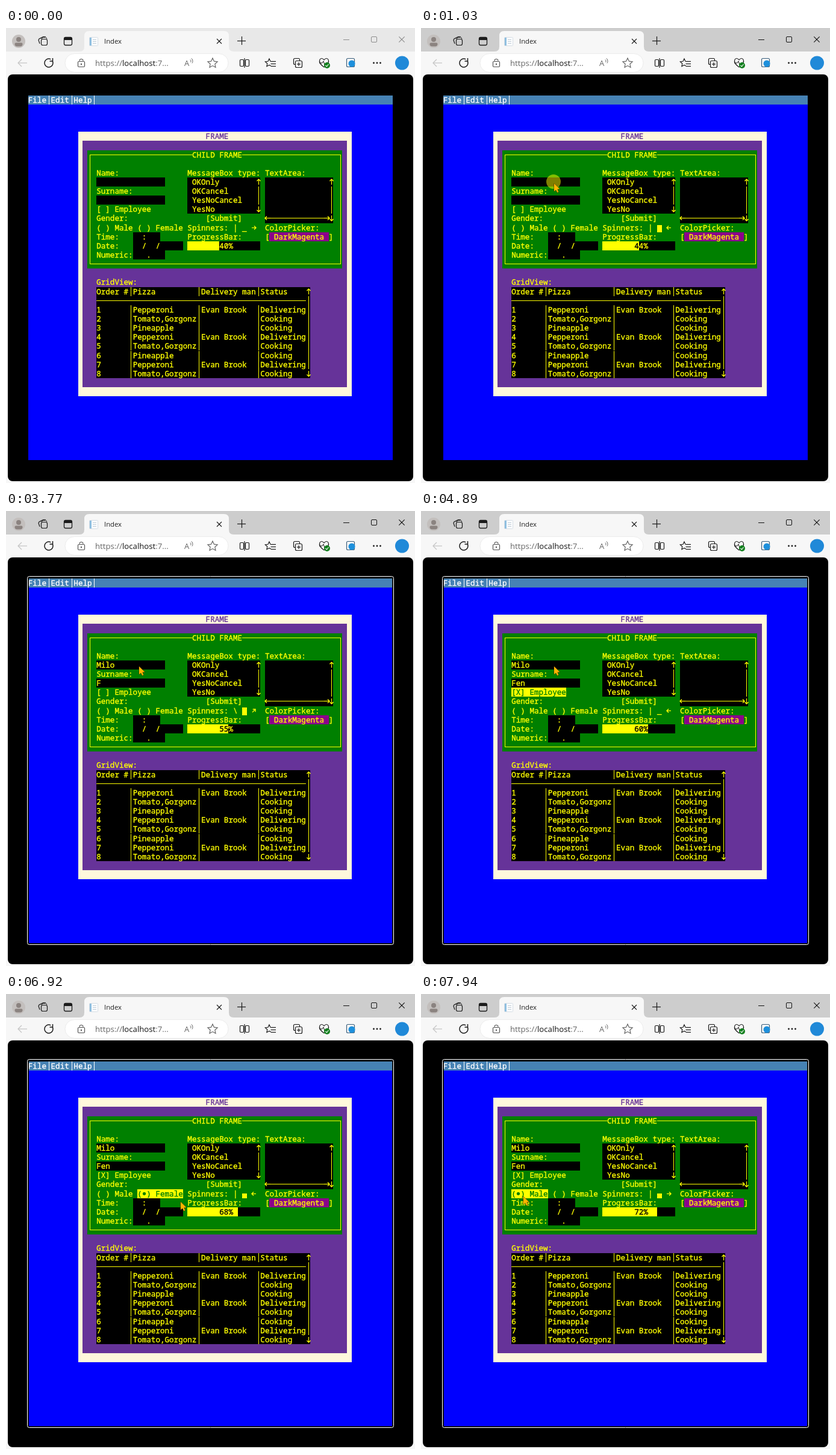
An HTML page with a canvas that plays this animation: 679 by 755 pixels, repeating every 8 s.

```html
<!DOCTYPE html>
<html lang="en">
<head>
<meta charset="utf-8">
<title>Index</title>
<style>
html, body { margin: 0; width: 100%; height: 100%; overflow: hidden; background: #f7f7f7; }
canvas { display: block; }
</style>
</head>
<body>
<canvas id="stage" width="679" height="755"></canvas>
<script>
const g = document.getElementById('stage').getContext('2d');
const LOOP = 8000, CW = 7.56, RH = 15.14;
const MONO = '12.6px "Noto Sans Mono", "DejaVu Sans Mono", monospace';
const SANS = '"Open Sans", "Noto Sans", sans-serif';
const YELLOW = '#ffff00', GREEN = '#008000', INK = '#1b1b1b';
const X = c => 36.76 + c * CW, Y = r => 111.67 + r * RH;
const midX = c => Math.round(X(c) + CW / 2), midY = r => Math.round(Y(r)) + 7;

// ---- character grid helpers ----
function cells(c, r, w, h, color) {
  const x = Math.round(X(c)), y = Math.round(Y(r));
  g.fillStyle = color;
  g.fillRect(x, y, Math.round(X(c + w)) - x, Math.round(Y(r + h)) - y);
}
function put(c, r, text, color = YELLOW) {
  const x = X(c), y = Math.round(Y(r) + 12);
  g.font = MONO;
  g.fillStyle = g.strokeStyle = color;
  g.lineWidth = .35;
  g.fillText(text, x, y);
  g.strokeText(text, x, y);
}
function vline(c, r, n, color = YELLOW) {
  g.fillStyle = color;
  g.fillRect(midX(c), Math.round(Y(r)), 1, Math.round(n * RH));
}
function hline(c, r, n) {
  g.fillStyle = YELLOW;
  g.fillRect(X(c), midY(r), n * CW, 1);
}
// dir counts eighths of a turn clockwise from east
function arrow(c, r, dir, half = 4.5) {
  g.save();
  g.translate(midX(c) + .5, midY(r) + .5);
  g.rotate(dir * Math.PI / 4);
  line([-half, 0, half, 0], YELLOW, 1.2);
  line([half - 3, -3, half, 0, half - 3, 3], YELLOW, 1.4);
  g.restore();
}
function scrollbar(c, r, n) {
  vline(c, r + 1, n - 2);
  arrow(c, r, 6);
  arrow(c, r + n - 1, 2);
}

// ---- drawing helpers ----
function line(p, color = INK, width = 1.2, close) {
  g.beginPath();
  for (let i = 0; i < p.length; i += 2) g.lineTo(p[i], p[i + 1]);
  if (close) g.closePath();
  g.strokeStyle = color;
  g.lineWidth = width;
  g.stroke();
}
function box(x, y, w, h, r, fill, stroke, width = 1.2) {
  g.beginPath();
  g.roundRect(x, y, w, h, r);
  if (fill) { g.fillStyle = fill; g.fill(); }
  if (stroke) { g.strokeStyle = stroke; g.lineWidth = width; g.stroke(); }
}
function disc(x, y, r, color) {
  g.beginPath();
  g.arc(x, y, r, 0, 7);
  g.fillStyle = color;
  g.fill();
}
function star(x, y, r, color) {
  const p = [];
  for (let i = 0; i < 10; i++) {
    const a = i * Math.PI / 5 - Math.PI / 2, d = i % 2 ? r * .48 : r;
    p.push(x + d * Math.cos(a), y + d * Math.sin(a));
  }
  line(p, color, 1.2, true);
}
function cross(x, y, d, color) {
  line([x - d, y - d, x + d, y + d], color, 1.1);
  line([x - d, y + d, x + d, y - d], color, 1.1);
}
function label(text, x, y, size, color) {
  g.font = size + 'px ' + SANS;
  g.fillStyle = color;
  g.fillText(text, x, y);
  return x + g.measureText(text).width;
}

// ---- browser window ----
function tabStrip(active) {
  g.fillStyle = active ? '#cdcdcd' : '#e8e8e8';
  g.fillRect(0, 0, 679, 39);
  disc(21, 22, 11, '#c3bfbd');
  disc(21, 19, 4, '#8b8380');
  box(14.5, 24.5, 13, 6, [3, 3, 6, 6], '#8b8380');

  box(58.5, 18.5, 10, 10, 2.5, null, INK);
  line([56, 26, 54, 20, 55, 18, 62, 14.5, 65, 16], INK);
  line([58, 18, 65, 14, 68, 18], INK, 1);
  box(96.5, 15.5, 13, 13, 2.5, null, INK, 1.3);
  g.fillStyle = INK;
  g.fillRect(97, 16, 12, 4);

  g.fillStyle = '#f7f7f7';
  g.beginPath();
  g.moveTo(122, 39);
  g.quadraticCurveTo(130, 39, 130, 31);
  g.lineTo(130, 13);
  g.quadraticCurveTo(130, 5, 138, 5);
  g.lineTo(362, 5);
  g.quadraticCurveTo(370, 5, 370, 13);
  g.lineTo(370, 31);
  g.quadraticCurveTo(370, 39, 378, 39);
  g.fill();
  box(138.5, 15.5, 14, 14, 1, '#fff', '#d5dde4', 1);
  g.fillStyle = '#8fbfe0';
  g.fillRect(139, 16, 3, 13);
  g.fillStyle = '#b9c8d4';
  for (let y = 19; y < 28; y += 3) g.fillRect(144, y, 6, 1);
  label('Index', 163, 26, 11.3, '#222');
  cross(354, 22, 4, INK);
  line([384, 21.5, 398, 21.5]);
  line([391.5, 14, 391.5, 28]);

  const tint = active ? '#111' : '#8c8c8c';
  line([560, 19.5, 570, 19.5], tint, 1);
  box(606.5, 14.5, 9, 9, 1.5, null, tint, 1);
  cross(657, 19, 4.7, tint);
}
function toolbar() {
  g.fillStyle = '#f7f7f7';
  g.fillRect(0, 39, 679, 716);
  line([35, 58, 20, 58], '#c4c4c4');
  line([26, 52, 20, 58, 26, 64], '#c4c4c4');
  g.beginPath();
  g.arc(71, 58, 7, -.5, 5.2);
  g.strokeStyle = INK;
  g.lineWidth = 1.5;
  g.stroke();
  line([77.5, 50, 77.5, 55, 72.5, 55], INK, 1.5);

  box(98, 42.5, 271, 31, 15.5, '#fff', '#ececec', 1);
  box(119.5, 55.5, 11, 9, 1.5, null, '#555');
  g.beginPath();
  g.arc(125, 54.5, 3, Math.PI, 0);
  g.stroke();
  disc(125, 60, 1.2, '#555');
  let x = label('https://', 148, 63, 13.2, '#666');
  x = label('localhost', x, 63, 13.2, '#111');
  label(':7...', x, 63, 13.2, '#666');
  label('A', 296, 63, 13, '#666');
  for (const r of [3, 6]) {
    g.beginPath();
    g.arc(304, 55, r, -.9, .6);
    g.strokeStyle = '#666';
    g.lineWidth = 1;
    g.stroke();
  }
  star(343, 58.5, 8.5, '#666');

  box(388.5, 52.5, 6, 11, 1.5, null, INK);
  box(397.5, 52.5, 6, 11, 1.5, null, INK);
  line([396, 50, 396, 66], INK);
  star(437, 58, 7, INK);
  g.fillStyle = '#f7f7f7';
  g.fillRect(440, 55, 9, 11);
  for (const y of [55.5, 59.5, 63.5]) line([440, y, 448, y], INK);
  box(477.5, 50.5, 10, 10, 2, null, INK);
  box(480.5, 54.5, 11, 11, 2, '#f7f7f7', INK);
  line([483, 60, 489, 60]);
  line([486, 57, 486, 63]);
  g.beginPath();
  g.moveTo(528, 65);
  g.bezierCurveTo(514, 55, 523, 46, 528, 53);
  g.bezierCurveTo(533, 46, 542, 55, 528, 65);
  g.strokeStyle = INK;
  g.stroke();
  line([520, 58, 525, 58, 527, 55, 529, 61, 531, 58, 535, 58], INK, 1);
  disc(533, 62, 5, '#13801f');
  line([530.5, 62, 532.5, 64, 535.5, 60], '#fff', 1.1);
  box(565.5, 50.5, 13, 14, 2, null, '#3a5f7d');
  disc(574, 59, 5.5, '#1e90dc');
  for (const d of [610.5, 616, 621.5]) disc(d, 58, 1.4, INK);
  disc(657.5, 58, 11.5, '#2089d8');
  box(3, 77, 673, 675, 8, '#000');
}

// ---- terminal screen ----
function screen(s) {
  cells(0, 0, 80, 40, '#0000ff');
  cells(0, 0, 80, 1, '#4682b4');
  ['File', 'Edit', 'Help'].forEach((m, i) => {
    put(i * 5, 0, m, '#fff');
    vline(i * 5 + 4, 0, 1, '#fff');
  });
  cells(11, 4, 60, 29, '#fff8dc');
  cells(12, 5, 58, 27, '#663399');
  put(39, 4, 'FRAME', '#663399');
  cells(13, 6, 56, 13, GREEN);
  g.strokeStyle = YELLOW;
  g.lineWidth = 1;
  g.strokeRect(midX(13) + .5, midY(6) + .5, midX(68) - midX(13), midY(18) - midY(6));
  cells(36, 6, 11, 1, GREEN);
  put(36, 6, 'CHILD FRAME');
  form(s);
  grid();
}
function choice(c, r, text, lit) {
  if (lit) cells(c, r, text.length, 1, YELLOW);
  put(c, r, text, lit ? GREEN : YELLOW);
}
function radio(c, text, on, lit) {
  choice(c, 14, '( ) ' + text, lit);
  if (on) disc(X(c + 1.5), Y(14) + 7.7, 2.6, lit ? GREEN : YELLOW);
}
function form(s) {
  put(15, 8, 'Name:');
  cells(15, 9, 15, 1, '#000');
  put(15, 9, s.name);
  put(15, 10, 'Surname:');
  cells(15, 11, 15, 1, '#000');
  put(15, 11, s.surname);
  if (s.blink && s.focus === 'name') put(15 + s.name.length, 9, '_');
  if (s.blink && s.focus === 'surname') put(15 + s.surname.length, 11, '_');
  choice(15, 12, (s.checked ? '[X]' : '[ ]') + ' Employee', s.blink && s.focus === 'check');
  put(15, 13, 'Gender:');
  radio(15, 'Male', s.gender === 'male', s.blink && s.focus === 'male');
  radio(24, 'Female', s.gender === 'female', s.blink && s.focus === 'female');
  [['Time:', 6, '  :'], ['Date:', 11, '  /  /'], ['Numeric:', 7, '   .']].forEach(([name, w, mask], i) => {
    put(15, 15 + i, name);
    cells(23, 15 + i, w, 1, '#000');
    put(23, 15 + i, mask);
  });

  put(35, 8, 'MessageBox type:');
  cells(35, 9, 16, 4, '#000');
  ['OKOnly', 'OKCancel', 'YesNoCancel', 'YesNo'].forEach((t, i) => put(36, 9 + i, t));
  scrollbar(50, 9, 4);
  put(39, 13, '[Submit]');

  put(52, 8, 'TextArea:');
  cells(52, 9, 15, 5, '#000');
  scrollbar(66, 9, 5);
  hline(53, 13, 12);
  arrow(52, 13, 4);
  arrow(65, 13, 0);

  put(35, 14, 'Spinners:');
  put(45, 14, '|/-\\'[s.step % 4]);
  const rise = Math.min(s.step % 10, 10 - s.step % 10);
  if (rise) cells(47, 15 - (rise + 2) / 8, 1, (rise + 2) / 8, YELLOW);
  else put(47, 14, '_');
  arrow(49, 14, s.step % 8, 3.5);

  put(35, 15, 'ProgressBar:');
  const percent = 40 + s.step, full = Math.ceil(percent * .16);
  cells(35, 16, 16, 1, '#000');
  cells(35, 16, full, 1, YELLOW);
  [...percent + '%'].forEach((ch, i) => put(42 + i, 16, ch, i + 7 < full ? '#000' : YELLOW));

  put(52, 14, 'ColorPicker:');
  cells(53, 15, 13, 1, '#8b008b');
  put(52, 15, '[ DarkMagenta ]');
}
function grid() {
  put(15, 20, 'GridView:');
  cells(15, 21, 47, 10, '#000');
  const pizzas = ['Pepperoni', 'Tomato,Gorgonz', 'Pineapple'];
  const row = (r, ...texts) => [15, 23, 38, 51].forEach((c, i) => {
    put(c, r, texts[i]);
    if (i) vline(c - 1, r, 1);
  });
  row(21, 'Order #', 'Pizza', 'Delivery man', 'Status');
  hline(15, 22, 46);
  for (let i = 0; i < 8; i++) {
    const out = i % 3 === 0;
    row(23 + i, String(i + 1), pizzas[i % 3], out ? 'Evan Brook' : '', out ? 'Delivering' : 'Cooking');
  }
  scrollbar(61, 21, 10);
}
function focusRing() {
  box(37, 110, 605, 608, 2, null, '#101010', 2);
  box(35.5, 108.5, 608, 611, 3, null, '#fff', 1);
}

// ---- pointer ----
const route = [
  [130, 655, 752], [890, 221, 258], [6200, 221, 258], [6480, 461, 137],
  [6790, 290, 345], [6980, 290, 345], [7500, 157, 333], [7740, 170, 336], [LOOP, 170, 336]
];
function pointer(t) {
  if (t < 130) return;
  const i = route.findIndex(p => p[0] > t);
  const [t0, x0, y0] = route[i - 1], [t1, x1, y1] = route[i];
  const u = (t - t0) / (t1 - t0), e = u * u * (3 - 2 * u);
  const x = x0 + (x1 - x0) * e, y = y0 + (y1 - y0) * e;
  if (t >= 940 && t < 1140) disc(x - 1, y - 3, 12, 'rgba(255,255,0,.5)');
  g.save();
  g.translate(x, y);
  line([0, 0, 0, 13, 3, 10.5, 5.2, 15, 7.4, 14, 5.4, 9.6, 9.4, 9.2], '#3a2a00', 1, true);
  g.fillStyle = '#ffb400';
  g.fill();
  g.restore();
}

// ---- timeline ----
const typed = (text, times, t) => text.slice(0, times.filter(k => t >= k).length);
const latest = (list, t) => list.reduce((v, [at, name]) => t >= at ? name : v, '');
function draw(t) {
  const step = Math.max(0, Math.floor((t - 122) / 250) + 1);
  tabStrip(t >= 940);
  toolbar();
  screen({
    step,
    blink: step % 2 === 0,
    name: typed('Milo', [2130, 2365, 2635, 2905], t),
    surname: typed('Fen', [3650, 3900, 4120], t),
    checked: t >= 4885,
    gender: latest([[5625, 'male'], [6810, 'female'], [7880, 'male']], t),
    focus: latest([[1140, 'name'], [3380, 'surname'], [4355, 'check'], [5200, 'male'],
      [6810, 'female'], [7880, 'male']], t)
  });
  if (t >= 1860) focusRing();
  pointer(t);
}
const start = performance.now();
function tick() {
  draw((performance.now() - start) % LOOP);
  requestAnimationFrame(tick);
}
tick();
</script>
</body>
</html>
```
